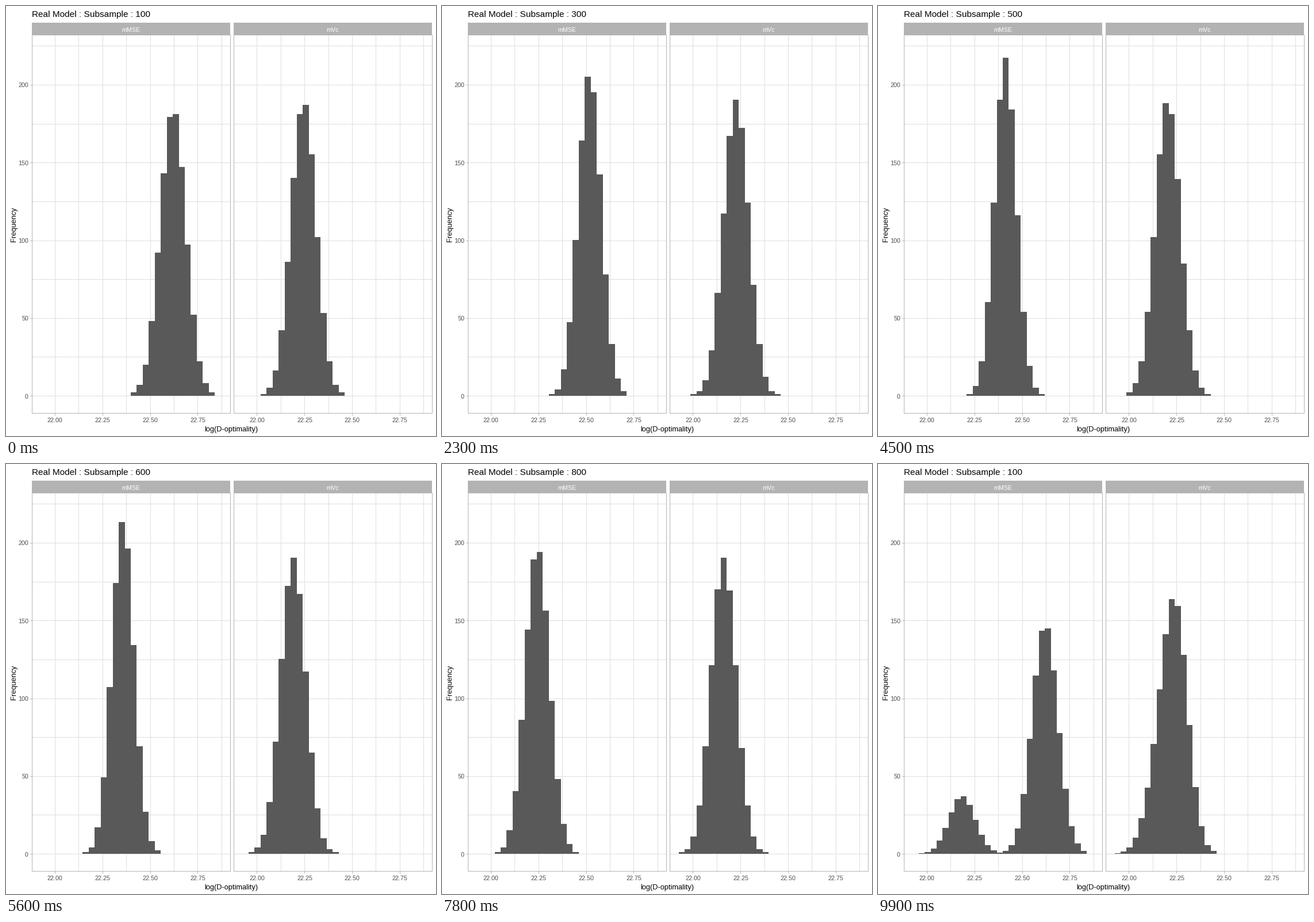
Recreate the animation shown at these times as a matplotlib script. Size 748x748 px, loop 10 s.

```python
import math

import matplotlib.pyplot as plt
import numpy as np
from matplotlib.animation import FuncAnimation
from matplotlib.patches import Rectangle

SIZE, DPI = 748, 88
PX = 72 / DPI                       # points per pixel
BINS, BIN_W = 30, 10.45
Y0, Y_SCALE = 678.16, 2.7065
BASE = math.floor(Y0)
TOP, BOTTOM = 50, 708
PANEL_W, PANEL_STEP = 345, 351.4
BAR, GRID, FRAME, TICK_TEXT = "#595959", "#DEDEDE", "#B3B3B3", "#4D4D4D"

# Each state rests, then morphs linearly into the next one
HOLD = 6
STEPS = np.array([6] * 2 + [5] * 7)
STARTS = np.cumsum(STEPS + HOLD) - STEPS
STATES = len(STEPS)

plt.rcParams["font.family"] = "Liberation Sans"


def bell(mean, sd):
    """Expected bin counts of 1000 normal draws, in units of bins."""
    z = (np.arange(BINS) - mean) / sd
    return np.round(1000 / (sd * math.sqrt(2 * math.pi)) * np.exp(-z * z / 2))


def mmse(s):
    return bell(21.55 - 1.58 * s - 0.018 * s * s, 1.84 + 0.02 * (s - 4) ** 2)


def mvc(s):
    return bell(9.65 - 0.26 * s - 0.017 * s * s, 2.1)


fig = plt.figure(figsize=(SIZE / DPI, SIZE / DPI), dpi=DPI, facecolor="white")
ax = fig.add_axes([0, 0, 1, 1])
ax.axis("off")


def y_px(value):
    return Y0 - Y_SCALE * value


def text(x, y, s, size, color="black", **kw):
    return ax.text(x, y, s, fontsize=size * PX, color=color, **kw)


def line(xs, ys, color):
    ax.plot(np.round(xs) + 0.5, np.round(ys) + 0.5, color=color, lw=PX, zorder=1,
            snap=False, solid_capstyle="butt")


def panel(left, dx, label):
    right = left + PANEL_W
    for v in range(0, 226, 25):
        line([left, right], [y_px(v)] * 2, GRID)
    for j in range(8):
        x = 85 + dx + 41.4 * j
        line([x, x], [TOP, BOTTOM], GRID)
        if j % 2 == 0:
            line([x, x], [BOTTOM, BOTTOM + 4], FRAME)
            text(x + 0.3, 724, f"{22 + j / 8:.2f}", 10.8, TICK_TEXT, ha="center")
    ax.add_patch(Rectangle((left + 0.5, TOP + 0.5), PANEL_W, BOTTOM - TOP, fill=False,
                           ec=FRAME, lw=PX, zorder=3, snap=False))
    ax.add_patch(Rectangle((left, 29), PANEL_W, TOP - 29, fc=FRAME, lw=0, zorder=3))
    text(left + PANEL_W / 2, 45, label, 10.7, "white", ha="center", zorder=4)
    edges = np.floor(60.7 + dx + BIN_W * np.arange(BINS + 1))
    return ax.stairs(np.full(BINS, BASE), edges, baseline=BASE, fill=True,
                     color=BAR, zorder=2)


panels = [(panel(45, 0, "mMSE"), mmse), (panel(396, PANEL_STEP, "mVc"), mvc)]

for v in range(0, 201, 50):
    line([42, 45], [y_px(v)] * 2, FRAME)
    text(39, y_px(v) + 4.5, str(v), 10.8, TICK_TEXT, ha="right")

title = text(45, 19, "", 15.4)
text(391.3, 740, "log(D-optimality)", 12.7, ha="center")
text(20, 379.5, "Frequency", 12.7, rotation=90, ha="right", va="center")

ax.set_xlim(0, SIZE)
ax.set_ylim(SIZE, 0)


def update(n):
    pos = np.clip((n - STARTS + 1) / STEPS, 0, 1).sum()
    i, t = int(pos), pos % 1
    for bars, shape in panels:
        h = (1 - t) * shape(i % STATES) + t * shape((i + 1) % STATES)
        bars.set_data(values=np.floor(y_px(h)))
    nearest = math.ceil(pos - 0.5) % STATES
    title.set_text(f"Real Model : Subsample : {100 * (nearest + 1)}")
    return [title] + [bars for bars, _ in panels]


anim = FuncAnimation(fig, update, frames=100, interval=100, repeat=True,
                     repeat_delay=0, blit=False)
plt.show()
```
